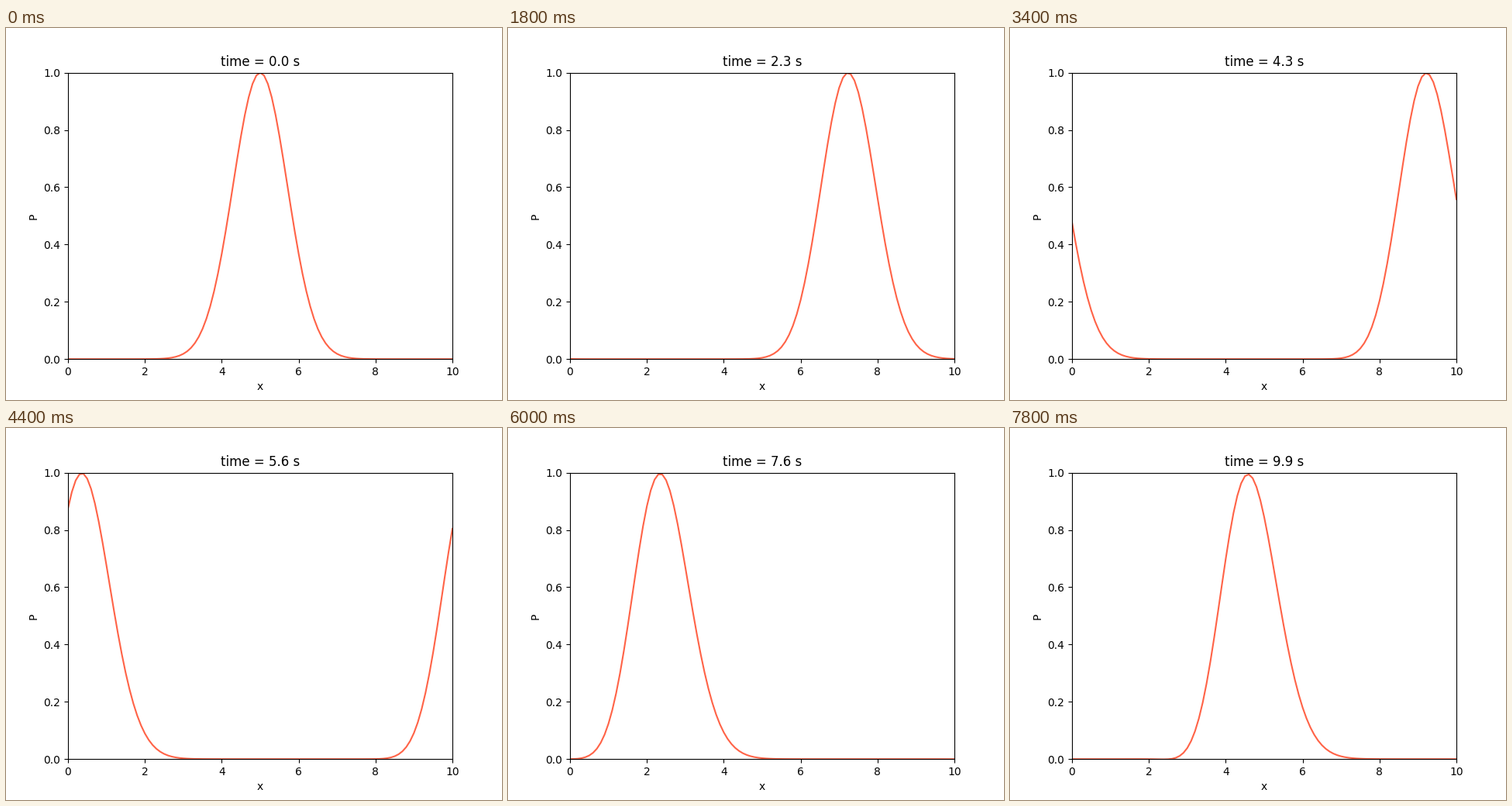
Write a matplotlib script that moves like this. It is 640 px wide and 480 px high and loops after 8 s.

```python
import numpy as np
import matplotlib.pyplot as plt
from matplotlib.animation import FuncAnimation

N_FRAMES = 40
INTERVAL = 200          # ms
DT = 20 / 79            # simulated seconds per frame
SPEED = 0.99

# Periodic advection of a Gaussian pulse with central differences,
# solved exactly in time through its discrete Fourier modes.
x = np.linspace(0, 10, 101)
dx = x[1] - x[0]
modes = np.fft.rfft(np.exp(-(x - 5) ** 2))
omega = SPEED * np.sin(2 * np.pi * np.fft.rfftfreq(x.size)) / dx


def pulse(t):
    return np.fft.irfft(modes * np.exp(-1j * omega * t), x.size)


fig, ax = plt.subplots(figsize=(6.4, 4.8), dpi=100)
line, = ax.plot(x, pulse(0), color="tomato")
ax.set_xlim(0, 10)
ax.set_ylim(0, 1)
ax.set_xlabel("x")
ax.set_ylabel("P")
title = ax.set_title("time = 0.0 s")


def update(i):
    t = i * DT
    line.set_ydata(pulse(t))
    title.set_text(f"time = {t:.1f} s")
    return line, title


anim = FuncAnimation(fig, update, frames=N_FRAMES, interval=INTERVAL,
                     repeat=True, blit=False)
plt.show()
```
